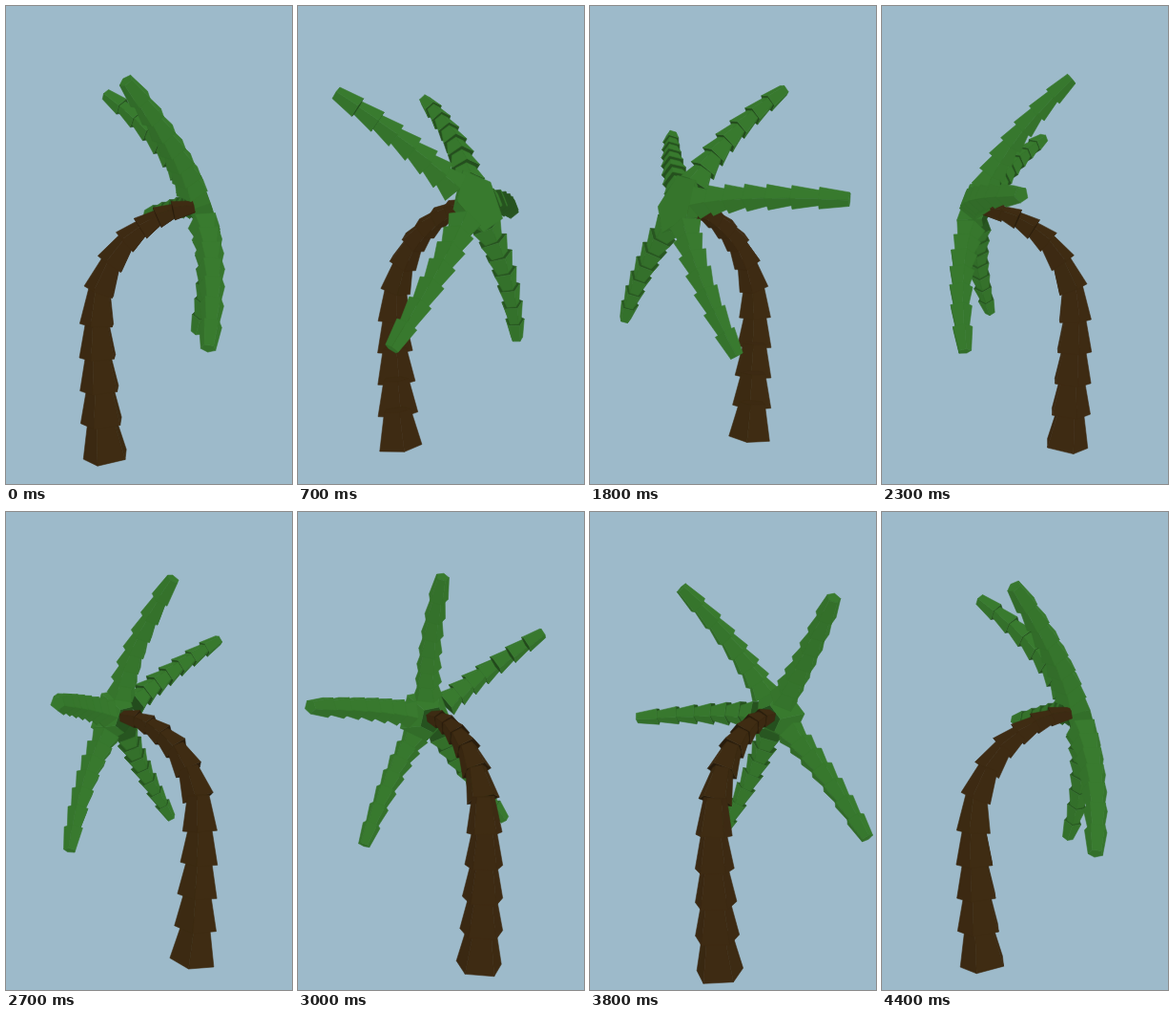
These frames come from a looping animation (300x500 px, 4500 ms). An HTML page with a canvas:

```html
<!DOCTYPE html>
<html lang="en">
<head>
<meta charset="utf-8">
<title>Turning palm</title>
<style>
html, body { margin: 0; width: 100%; height: 100%; overflow: hidden; background: #9dbaca; }
canvas { display: block; width: 300px; height: 500px; }
</style>
</head>
<body>
<canvas id="stage" width="300" height="500"></canvas>
<script>
const ctx = document.getElementById('stage').getContext('2d');
const LOOP = 4500, STEP = 100, CAMERA = 600;
const BROWN = [69, 48, 21], GREEN = [62, 134, 51];

// Vector helpers
const add = (a, b, k = 1) => a.map((v, i) => v + b[i] * k);
const sub = (a, b) => add(a, b, -1);
const dot = (a, b) => a[0] * b[0] + a[1] * b[1] + a[2] * b[2];
const cross = (a, b) => [
  a[1] * b[2] - a[2] * b[1],
  a[2] * b[0] - a[0] * b[2],
  a[0] * b[1] - a[1] * b[0]
];
const unit = a => a.map(v => v / Math.hypot(...a));
const mix = (a, b, t) => add(a, sub(b, a), t);

const LIGHT = unit([0.25, -0.6, -0.75]);

// Five-sided tapered block from p to q; one flat side faces ref.
function block(p, q, r0, r1, ref, color, bias = 0) {
  const axis = unit(sub(q, p));
  const u = unit(cross(axis, ref)), w = cross(axis, u);
  const ring = (c, r) => [0, 1, 2, 3, 4].map(k => {
    const a = (18 + 72 * k) * Math.PI / 180;
    return add(add(c, u, r * Math.cos(a)), w, r * Math.sin(a));
  });
  return { points: [...ring(p, r0), ...ring(q, r1)], mid: mix(p, q, 0.5), color, bias };
}

const FACES = [[0, 1, 2, 3, 4], [5, 6, 7, 8, 9]];
for (let k = 0; k < 5; k++) FACES.push([k, (k + 1) % 5, (k + 1) % 5 + 5, k + 5]);

const blocks = [];

// Trunk: spine in a vertical plane, bending towards the crown
const spine = [[-43, 215], [-47, 180], [-49, 147], [-51, 114], [-52, 81], [-50, 48],
  [-39, 20], [-24, -2], [-8, -16], [9, -27], [25, -34], [44, -38]].map(([x, y]) => [x, y, -17]);
for (let i = 0; i < spine.length - 1; i++) {
  const r = 24 - 1.35 * i;
  const inner = cross([0, 0, 1], sub(spine[i + 1], spine[i]));
  blocks.push(block(spine[i], mix(spine[i], spine[i + 1], 1.08), r, r * 0.63, inner, BROWN, i * 0.6));
}

// Crown: five drooping fronds around a hub
const hub = [55, -40, -18];
const normal = unit([0.93, -0.33, -0.1]);
const tips = [[-47, -165, 30], [-2, -40, 144], [55, 100, 62], [49, 85, -128], [-19, -135, -128]];
const FROND_PARTS = 7;

tips.forEach((tip, n) => {
  const reach = sub(tip, hub);
  const droop = dot(reach, normal);
  const radial = add(reach, normal, -droop);
  if (n === 0) {
    blocks.push(block(add(hub, normal, -14), add(hub, normal, 7), 16, 33, unit(radial), GREEN, 4));
  }
  const root = add(add(hub, unit(radial), 25), normal, -5);
  const bend = add(add(hub, radial, 0.52), normal, droop * 0.2);
  const at = t => mix(mix(root, bend, t), mix(bend, tip, t), t);
  for (let k = 0; k < FROND_PARTS; k++) {
    const r = 16.5 - 1.05 * k;
    blocks.push(block(at(k / FROND_PARTS), at((k + 1) / FROND_PARTS), r, r * 0.63, normal, GREEN));
  }
});

// Turn in degrees against step number
const turns = [[0, 0], [7, 38], [13, 89], [18, 136], [23, 182], [30, 236], [38, 308], [44, 355.5], [45, 360]];
const slopes = turns.map((_, i) => {
  const a = turns[Math.max(0, i - 1)], b = turns[Math.min(turns.length - 1, i + 1)];
  return (b[1] - a[1]) / (b[0] - a[0]);
});

function turnAt(step) {
  let i = 0;
  while (step >= turns[i + 1][0]) i++;
  const [x0, y0] = turns[i], [x1, y1] = turns[i + 1];
  const h = x1 - x0, t = (step - x0) / h, s = 1 - t;
  return y0 * (1 + 2 * t) * s * s + y1 * (3 - 2 * t) * t * t
    + h * t * s * (slopes[i] * s - slopes[i + 1] * t);
}

function draw(step) {
  const a = turnAt(step) * Math.PI / 180, c = Math.cos(a), s = Math.sin(a);
  const spin = ([x, y, z]) => [x * c + z * s, y, z * c - x * s];
  const project = ([x, y, z]) => {
    const k = CAMERA / (CAMERA + z);
    return [150 + x * k, 250 + y * k];
  };
  const eye = [0, 0, -CAMERA];

  ctx.fillStyle = '#9dbaca';
  ctx.fillRect(0, 0, 300, 500);
  ctx.lineJoin = 'round';
  ctx.lineWidth = 0.6;

  blocks
    .map(b => ({ ...b, points: b.points.map(spin), mid: spin(b.mid) }))
    .sort((p, q) => (q.mid[2] - q.bias) - (p.mid[2] - p.bias))
    .forEach(b => FACES.forEach((face, f) => {
      const pts = face.map(i => b.points[i]);
      let n = unit(cross(sub(pts[1], pts[0]), sub(pts[2], pts[0])));
      if (dot(n, sub(pts[0], b.mid)) < 0) n = n.map(v => -v);
      if (dot(n, sub(eye, pts[0])) <= 0) return;
      const lit = (0.83 + 0.09 * dot(n, LIGHT)) * (f === 0 ? 0.7 : 1);
      ctx.fillStyle = ctx.strokeStyle = `rgb(${b.color.map(v => Math.round(v * lit))})`;
      ctx.beginPath();
      pts.forEach(p => ctx.lineTo(...project(p)));
      ctx.closePath();
      ctx.fill();
      ctx.stroke();
    }));
}

const start = performance.now();
function tick() {
  draw(Math.floor(((performance.now() - start) % LOOP) / STEP));
  requestAnimationFrame(tick);
}
tick();
</script>
</body>
</html>
```
